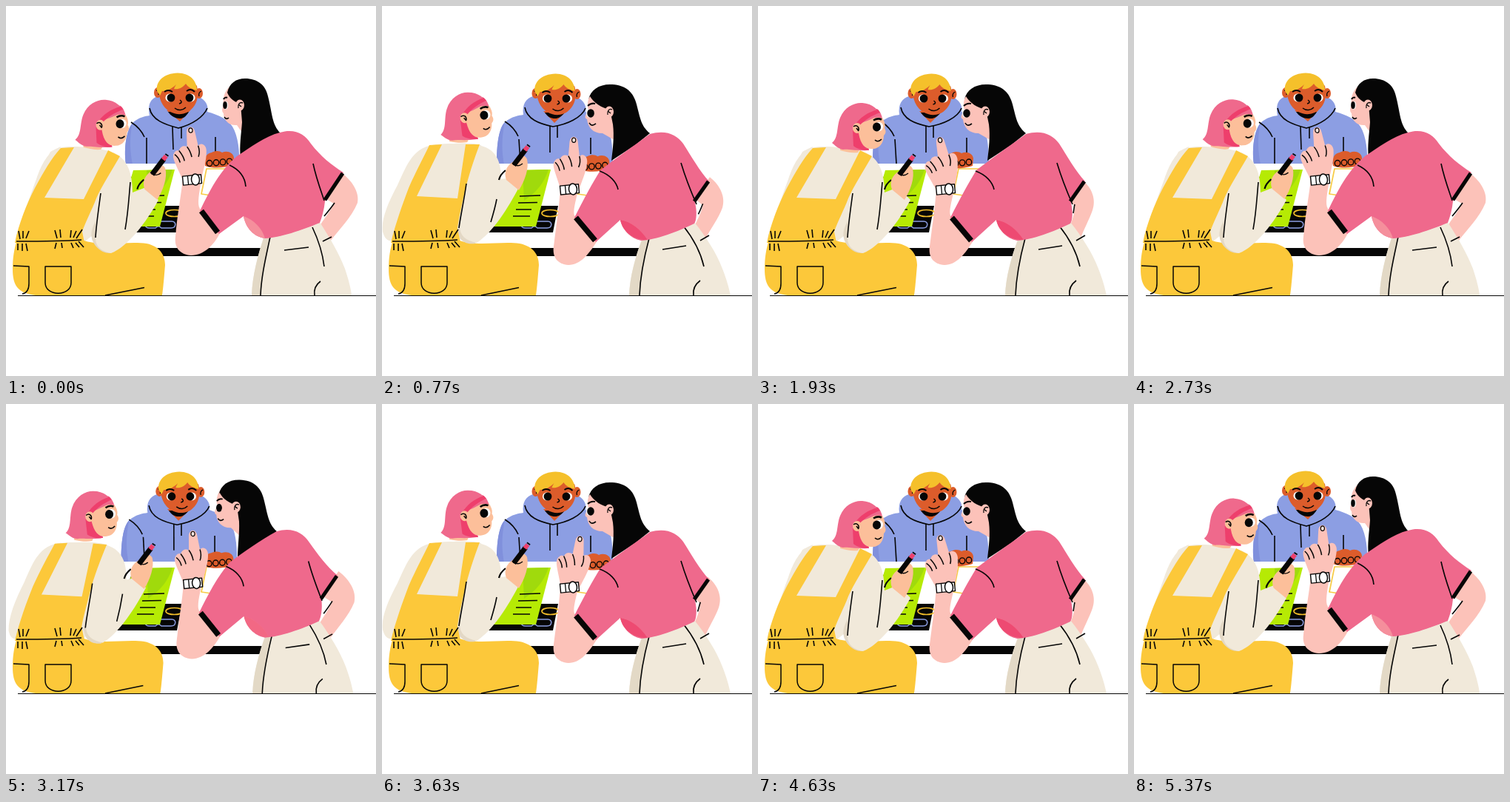
These frames come from a looping animation (500 px wide and 500 px high, 5.41 s). An HTML page with a canvas:

```html
<!DOCTYPE html>
<html lang="en">
<head>
<meta charset="utf-8">
<title>Table talk</title>
<style>
html, body { margin: 0; width: 100%; height: 100%; overflow: hidden; background: #fff; }
canvas { display: block; width: 500px; height: 500px; }
</style>
</head>
<body>
<canvas id="stage" width="500" height="500"></canvas>
<script>
const ctx = document.getElementById('stage').getContext('2d');
const CYCLE = 2705;
const INK = '#060606', SKIN = '#fcc2b9', PEACH = '#fcbf9a', PINK = '#ef698c', ROSE = '#ee3f6c',
  CREAM = '#f1e9da', YELLOW = '#fcc83a', BLUE = '#8c9ee3', SHADE = '#8090dc', TAN = '#dc5c2b',
  BLOND = '#f5c02b', LIME = '#b6ea04';

// Periodic eased track through [time, value] knots
function key(t, ...knots) {
  const i = knots.findLastIndex(k => k[0] <= t);
  const last = knots[knots.length - 1];
  const a = i < 0 ? [last[0] - CYCLE, last[1]] : knots[i];
  const b = knots[i + 1] || [knots[0][0] + CYCLE, knots[0][1]];
  const u = (t - a[0]) / (b[0] - a[0]);
  return a[1] + (b[1] - a[1]) * u * u * (3 - 2 * u);
}

// Blend two path strings of equal structure
function blend(a, b, k) {
  if (!b || k === 0) return new Path2D(a);
  const nums = b.match(/-?[\d.]+/g);
  let i = 0;
  return new Path2D(a.replace(/-?[\d.]+/g, n => (+n + (nums[i++] - n) * k).toFixed(2)));
}

function fill(color, a, b, k = 0) {
  ctx.fillStyle = color;
  ctx.fill(blend(a, b, k));
}

function line(a, b, k = 0, width = 1.6, color = INK) {
  ctx.strokeStyle = color;
  ctx.lineWidth = width;
  ctx.stroke(blend(a, b, k));
}

function oval(color, x, y, rx, ry = rx, edge) {
  ctx.beginPath();
  ctx.ellipse(x, y, rx, ry, 0, 0, 7);
  ctx.fillStyle = color;
  ctx.fill();
  if (edge) {
    ctx.strokeStyle = INK;
    ctx.lineWidth = edge;
    ctx.stroke();
  }
}

function group(x, y, angle, px, py, draw) {
  ctx.save();
  ctx.translate(x + px, y + py);
  ctx.rotate(angle);
  ctx.translate(-px, -py);
  draw();
  ctx.restore();
}

function friend(k) {
  fill(BLUE,
    'M162 214 C159 190 163 168 171 158 C180 150 188 149 194 148 C191 132 196 125 205 122 L261 123 C270 127 274 135 272 143 C287 147 300 153 306 163 C314 176 316 198 315 214Z',
    'M155 214 C155 186 158 165 166 157 C176 149 184 148 191 147 C189 132 195 125 204 122 L265 124 C273 128 277 136 275 143 C289 148 300 154 305 164 C311 176 312 198 312 214Z', k);
  fill(SHADE,
    'M162 214 C159 190 163 168 171 158 C166 180 168 198 171 214Z',
    'M155 214 C155 186 158 165 166 157 C161 180 162 198 165 214Z', k);
  line('M194 138 C197 154 214 160 233 165 C252 160 267 150 272 138', 'M193 137 C196 153 212 159 231 163 C250 160 270 151 275 138', k);
  line('M169 157 C177 162 183 168 187 177', 'M166 156 C174 161 180 167 184 176', k);
  line('M190 178 L190 213', 'M185 180 L187 213', k);
  line('M283 177 L283 201', 'M282 178 L282 200', k);
  line('M225 163 L226 194', 'M227 162 L227 198', k);
  line('M237 164 L237 179', 'M237 162 L237 178', k);
  fill(TAN, 'M217 141 L249 141 L235 156Z', 'M218 142 L249 142 L233 158Z', k);
  fill(INK, 'M219 143 L247 143 C243 150 239 152 235 152 C229 152 223 149 219 143Z', 'M220 144 L247 144 C242 150 238 152 234 152 C228 152 224 150 220 144Z', k);
  group(2.5 * k, k, 0, 0, 0, () => {
    oval(TAN, 205, 117, 5, 7);
    oval(TAN, 261, 118, 5, 7);
    fill(TAN, 'M207 108 C205 124 211 137 222 143 C231 148 243 147 250 140 C258 133 261 122 258 108 C245 92 220 92 207 108Z');
    line('M203 114 C206 114 207 117 206 120 M264 115 C261 116 260 119 261 122', null, 0, 1.3);
    const look = -3 * k;
    oval('#fff', 221 + look / 3, 124, 5.6, 5.4);
    oval('#fff', 250 + look / 3, 124, 5.6, 5.4);
    oval(INK, 223 + look / 2, 124, 5.4, 5.6);
    oval(INK, 248 + look / 2, 124, 5.4, 5.6);
    fill(BLOND, 'M204 115 C202 102 213 91 232 90.5 C249 91 258 101 258 114 C251 112 246 110 243 105 C238 111 233 113 227 112 C228 109 229 108 230 106 C223 113 216 115 211 115 L208 121Z');
    line('M214 116 C218 113 222 114 225 116 M244 115 C248 112 252 113 255 116', null, 0, 2);
    line('M235 127 C238 129 238 131 234 132 M228 138 C233 142 239 141 243 137', null, 0, 1.5);
  });
}

function table() {
  ctx.fillStyle = '#fff';
  ctx.fillRect(150, 213, 200, 178);
  ctx.fillStyle = INK;
  ctx.fillRect(150, 327, 203, 11);
  fill(INK, 'M172 225 L215 225 L213 270 L238 270 L231 306 L140 306Z');
  line('M216 280 C216 274 239 274 239 280 C239 286 216 286 216 280Z', null, 0, 1.6, BLOND);
  line('M194 291 L224 291 C231 291 230 300 223 300 L210 300 C207 297 205 297 202 300 L194 300 C186 300 186 291 194 291Z', null, 0, 1.5, BLUE);
  fill(LIME, 'M172 222 L228 221 L208 298 L150 298Z');
  fill('#a0da0c', 'M190 222 L225 221 C219 240 208 252 192 263Z');
  line('M186 257 L214 256 M184 266 L210 265.5 M181 275 L202 275 M177 284 L200 284', null, 0, 1.5);
  line('M302 220 L271 220 L264 254 L298 259', null, 0, 1.7, '#f7cb45');
}

function fists(x, y) {
  group(x, y, 0, 0, 0, () => {
    fill(TAN, 'M269 216 C267 207 270 199 278 198 C284 195 289 196 292 198 C299 195 307 198 308 205 L307 215 C295 219 280 220 269 216Z');
    for (let i = 0; i < 4; i++) oval(TAN, 275 + i * 9, 212.5 - i * 0.8, 3.7, 4, 1.4);
  });
}

function writerHead(x, y, tilt) {
  group(x, y, tilt, 130, 165, () => {
    fill(PEACH, 'M104 179 L136 179 L128 193 C119 194 112 192 104 190Z');
    fill(PINK, 'M93 180 C102 173 99 158 104 146 C110 131 124 125 134 126 C148 127 157 135 160 147 L140 160 L141 190 C124 191 116 188 108 189 C101 188 97 183 93 180Z');
    fill(ROSE, 'M121 163 L139 163 L143 190 C134 190 127 188 122 184Z');
    fill(PEACH, 'M127 154 C138 152 148 147 158 142 C163 148 166 155 164 160 C167 165 165 168 163 170 C163 180 157 188 148 188 C139 189 132 184 129 167Z');
    oval('#fff', 156.5, 158, 5.6, 6.2);
    oval(INK, 153.5, 158.5, 5.5, 6);
    fill(PINK, 'M122 155 C128 142 142 133 154 134 C158 137 160 142 161 147 C152 143 140 148 131 154Z');
    fill(ROSE, 'M124 156 C130 146 142 138 155 135 L158 139 C147 143 137 149 130 157Z');
    oval(PEACH, 127, 160, 6, 7);
    line('M122 158 C126 155 130 158 129 163 M126 160 L129 164', null, 0, 1.5);
    line('M149 149.5 C153 147 157 147 160 148.5', null, 0, 2.6);
    line('M151 176 C154 179 157 178 160 175', null, 0, 1.6);
  });
}

function writer(k, head, hand) {
  fill(CREAM,
    'M74 190 C56 197 48 214 41 234 C32 258 22 288 14 310 C13 316 13 318 15 318 L60 250Z',
    'M75 187 C42 189 34 214 21 242 C7 268 -1 288 1 305 C4 317 10 318 15 317 L60 250Z', k);
  fill(CREAM,
    'M60 197 C72 189 90 189 110 191 C130 193 145 196 154 204 L130 300 L104 320 L16 318 C22 285 38 238 60 197Z',
    'M56 193 C64 187 80 186 96 186 C112 185 124 185 134 188 L112 300 L104 320 L16 318 C22 285 36 238 56 193Z', k);
  fill(YELLOW,
    'M15 316 L102 316 C130 326 165 317 190 321 C209 325 215 338 215 350 C213 375 212 385 211 391 L40 391 C16 388 9 378 9 355 C9 340 11 328 15 316Z',
    'M15 316 L102 316 C128 326 162 317 186 321 C206 325 212 338 212 350 C210 375 209 385 208 391 L40 391 C16 388 9 378 9 355 C9 340 11 328 15 316Z', k);
  fill('#e3d8c5',
    'M125 285 C114 300 112 313 121 324 C127 331 133 334 141 334 L150 300Z',
    'M109 275 C102 292 101 306 106 315 C112 321 118 322 126 321 L136 290Z', k);
  fill(CREAM,
    'M145 198 C164 206 171 226 171 252 L189 245 L206 262 C190 292 164 326 142 334 C126 331 120 323 121 310 C121 285 124 262 127 244Z',
    'M122 187 C152 189 161 206 161 234 L168 233 L185 245 C171 272 150 306 128 320 C113 317 105 310 105 298 C106 276 110 256 114 238Z', k);
  fill(YELLOW,
    'M74 192 L92 191 L52 259 L105 261 L138 195 L154 203 C143 222 129 244 122 260 C116 276 108 290 103 305 L106 320 L12 320 C17 295 28 267 39 246 C51 224 61 206 74 192Z',
    'M64 188 L81 187 L47 257 L102 260 L113 187 L132 187 C124 208 116 232 111 255 C107 272 104 286 102 300 L106 320 L12 320 C18 295 28 267 36 246 C46 223 56 205 64 188Z', k);
  line('M14 318 C45 318 75 318 102 316');
  line('M17 304 L19 315 M23 304 L23 314 M31 304 L27 314 M16 321 L16 330 M22 321 L22 331 M27 321 L29 331');
  line('M66 303 L69 314 M73 302 L74 313 M88 303 L87 313 M95 304 L91 313 M103 302 L95 314');
  line('M68 320 L66 328 M75 320 L76 327 M88 320 L91 327 M94 320 L99 326 M98 318 L105 326');
  line('M53 352 L88 352 L88 374 C88 393 53 393 53 374Z M10 351 L31 352 L31 375 C31 384 28 388 22 389', null, 0, 1.5);
  line('M134 391 L187 380.5', 'M134 391 L185 380.5', k);
  line('M128 253 C125 275 122 295 121 313', 'M114 240 C111 262 106 284 104 300', k);
  line('M168 238 C166 260 165 280 161 302', 'M155 261 C153 272 150 282 147 292', k);
  group(hand.x, hand.y, 0, 0, 0, () => {
    line('M187 236 C182 240 179 244 178 249', null, 0, 2.2);
    fill(PEACH, 'M188 249 C184 238 189 229 198 224 C204 214 213 214 216 221 C219 233 213 250 205 263Z');
    line('M198 229 L214 208', null, 0, 7);
    line('M213 209 L217 204', null, 0, 6, ROSE);
    line('M217.5 203.5 L218.5 202', null, 0, 5, INK);
    line('M197 228 C202 230 205 231 210 227', null, 0, 1.4);
  });
  writerHead(head.x, head.y, head.tilt);
}

function speakerHead(k) {
  fill(SKIN,
    'M302 109 C294 117 293 126 294 134 C291 140 292 143 294 145 C294 155 302 162 312 161 L324 178 L345 160 L330 118Z',
    'M284 117 C277 126 277 134 279 141 C273 149 274 152 277 153 C278 164 285 172 298 172 L312 180 L338 164 L322 122Z', k);
  line('M294 126 C295 124 297 123 299 124', 'M278 135 C281 132 284 131 288 132', k, 2);
  const eye = (a, b) => a + (b - a) * k;
  oval('#fff', eye(297, 280), eye(134, 145), eye(3, 4), 5.5);
  oval(INK, eye(296, 282), eye(134, 145), eye(2.8, 4.8), eye(5, 5.8));
  line('M295 150 C297 153 299 153 301 151', 'M280 158 C282 162 285 162 289 159', k);
  fill(INK,
    'M299 117 C302 104 311 98 323 98 C340 98 351 107 354 122 C360 145 359 160 371 172 L350 190 L317 205 C315 190 318 172 319 157 L317 132 C309 130 302 125 299 117Z',
    'M279 126 C282 113 294 105 311 106 C330 107 340 117 344 133 C349 152 350 162 362 172 L342 188 L310 209 C312 192 314 176 312 160 L308 140 C297 138 286 131 281 122Z', k);
  const x = eye(316, 307), y = eye(134, 143);
  oval(SKIN, x, y, 6, 7.5);
  group(x, y, 0, 0, 0, () => line('M4 -3 C0 -5 -3 -1 -2 4 M-2 -1 L2 2', null, 0, 1.4));
}

function speakerHand(k, wag) {
  group(251 + 2 * k, 235 + 13 * k, wag * Math.PI / 180, 0, 0, () => {
    fill(SKIN, 'M-12 0 C-18 -16 -25 -27 -24 -34 C-22 -40 -19 -41 -16 -40 C-14 -46 -9 -47 -5 -45 L-5 -64 C-5 -73 4 -74 6 -66 L10 -46 C15 -51 21 -46 21 -39 C21 -25 16 -14 13 0Z');
    line('M-16 -40 C-13 -36 -10 -32 -9 -26 M-22 -35 C-18 -32 -16 -28 -15 -24 M-5 -45 C-2 -41 0 -36 1 -31 M10 -46 C12 -40 12 -36 10 -31', null, 0, 1.5);
    oval('#ffe4de', 0.5, -67, 2.6, 3.2, 1.2);
  });
  group(251 + 2 * k, 235 + 13 * k, -0.1, 0, 0, () => {
    ctx.fillStyle = '#fff';
    ctx.fillRect(-12, -6, 25, 12);
    ctx.strokeStyle = INK;
    ctx.lineWidth = 1.4;
    ctx.strokeRect(-12, -6, 25, 12);
    line('M-5 -6 L-5 6', null, 0, 1.3);
    oval('#fff', 5, 0, 5.5, 7.5, 1.5);
  });
}

function speaker(k, elbow, wag) {
  fill(SKIN,
    'M452 224 C468 236 478 252 475 266 C467 286 450 302 438 318 L424 297 C432 284 440 275 443 267 L428 258Z',
    'M438 235 C452 246 457 262 452 276 C448 288 441 300 436 314 L422 296 C426 286 428 278 428 270 L420 262Z', elbow);
  line('M444 266 C440 272 435 278 430 284', 'M428 268 C427 272 427 276 426 280', elbow);
  fill(CREAM,
    'M349 310 C372 310 400 302 424 292 C438 314 450 334 458 355 C463 370 466 382 467 391 L332 391 C333 364 340 338 349 310Z',
    'M352 313 C374 312 400 304 422 292 C438 312 452 334 460 355 C466 370 469 382 471 391 L334 391 C335 366 342 340 352 313Z', k);
  fill('#e3d9c6',
    'M349 311 L357 311 C351 340 345 365 344 391 L332 391 C333 364 340 338 349 311Z',
    'M352 314 L361 313 C354 340 349 365 348 391 L334 391 C335 366 342 340 352 314Z', k);
  line('M357 312 C351 340 345 365 344 391', 'M361 314 C354 340 349 365 348 391', k);
  line('M376 330 L409 326', 'M379 329 L411 324', k);
  line('M414 299 C423 318 428 335 430 352', 'M407 297 C419 312 430 330 435 352', k);
  line('M428 318 L440 312', 'M430 317 L442 310', k);
  line('M425 372 C418 377 416 384 417 391', 'M430 371 C422 377 420 384 421 391', k);
  fill(SKIN,
    'M262 274 L290 305 C282 322 268 337 250 337 C235 336 227 326 229 312 C231 285 236 260 239 234 L264 235 C261 253 258 268 262 274Z',
    'M260 283 L291 317 C280 335 268 350 252 350 C237 349 230 339 232 325 C235 300 239 275 241 248 L265 249 C261 266 258 277 260 283Z', k);
  speakerHand(k, wag);
  speakerHead(k);
  fill(PINK,
    'M370 171 C390 165 404 173 412 186 C425 203 440 215 456 225 L431 264 C430 275 427 285 424 293 C400 303 370 313 350 314 C335 312 324 300 321 284 L288 308 L262 277 C275 250 289 222 312 203 C330 191 350 176 370 171Z',
    'M362 173 C384 167 398 174 407 186 C418 203 429 223 442 237 L423 266 C426 278 425 290 422 294 C400 305 370 316 350 317 C335 314 325 302 322 289 L289 319 L260 286 C272 262 284 240 295 222 C313 208 340 189 362 173Z', k);
  const hem = [
    'M321 284 C335 289 346 300 350 314 C335 312 324 300 321 284Z',
    'M322 289 C336 291 350 302 359 316 C340 317 325 305 322 289Z'];
  fill('#f58f9c', ...hem, k);
  ctx.globalAlpha = 0.85 * k;
  fill(ROSE, ...hem, k);
  ctx.globalAlpha = 1;
  line('M264 277 L286 306', 'M262 286 L288 317', k, 7.5);
  line('M455 226 L431 262', 'M441 237 L422 264', k, 5);
  line('M415 213 C419 232 425 248 430 263', 'M404 212 C410 232 418 252 425 268', k);
  line('M302 215 C315 221 323 231 324 244', 'M294 223 C308 228 317 238 319 248', k);
}

function draw(now) {
  const t = now % CYCLE;
  const lean = key(t, [70, 0], [620, 1], [1050, 1], [1700, 0]);
  const head = {
    x: key(t, [625, -15], [1000, -15], [1750, 7], [2355, 7]),
    y: key(t, [625, -9], [1000, -9], [1750, 5], [2355, 5]),
    tilt: key(t, [50, 0], [625, -0.08], [1000, -0.08], [1750, 0])
  };
  const hand = {
    x: key(t, [600, -20], [1000, -20], [1750, -7], [2100, -7], [2505, 3]),
    y: key(t, [600, -14], [1000, -14], [1750, -1], [2100, -1], [2505, 1])
  };
  const turn = key(t, [100, 0], [550, 1], [2050, 1], [2550, 0]);
  const bend = key(t, [60, 0], [800, 1], [2000, 1], [2600, 0]);
  const elbow = key(t, [200, 0], [1150, 1], [2000, 1], [2600, 0]);
  const drift = key(t, [100, 4], [925, 11], [1850, -1], [2600, 4]);
  const wag = drift - 8 * Math.sin((t + 48) / CYCLE * 7 * 2 * Math.PI);

  ctx.fillStyle = '#fff';
  ctx.fillRect(0, 0, 500, 500);
  ctx.lineCap = 'butt';
  ctx.lineJoin = 'round';
  friend(turn);
  table();
  fists(key(t, [100, 0], [700, -1], [950, 1], [1800, -17], [2050, -17], [2600, 0]),
    key(t, [100, 0], [700, 5], [950, 6], [1800, 1], [2600, 0]));
  writer(lean, head, hand);
  speaker(bend, elbow, wag);
  ctx.fillStyle = INK;
  ctx.fillRect(16, 391, 484, 1);
}

function tick() {
  draw(performance.now());
  requestAnimationFrame(tick);
}
tick();
</script>
</body>
</html>
```
